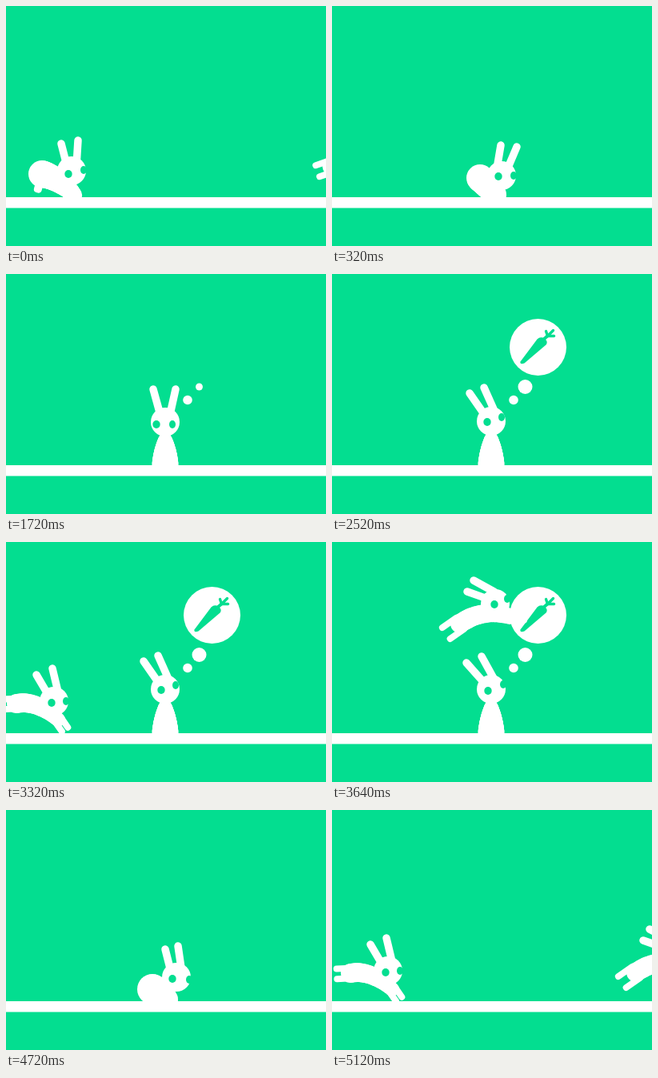
Recreate the animation shown at these times as an HTML page with a canvas. Size 400 px wide and 300 px high, loop 5.16 s.

```html
<!DOCTYPE html>
<html lang="en">
<head>
<meta charset="utf-8">
<title>Rabbits</title>
<style>
html, body { margin: 0; width: 100%; height: 100%; overflow: hidden; background: #03de90; }
canvas { display: block; width: 400px; height: 300px; }
</style>
</head>
<body>
<canvas id="stage" width="400" height="300"></canvas>
<script>
const g = document.getElementById('stage').getContext('2d');
const GREEN = '#03de90', WHITE = '#fff', LOOP = 5160, STEP = 40, TAU = Math.PI * 2;

// Offsets from the head centre.
// body: hip, middle and chest as x, y, radius; hind: length, angle, spread; fore: length, angle
// ears: two tips; eyes: two centres
const pose = (body, hind, fore, ears, eyes) => [...body, ...hind, ...fore, ...ears, ...eyes];
const blend = (a, b) => a.map((v, i) => (v + b[i]) / 2);

const rise = pose([-44, 25, 12, -15, 5, 12, 18, 16, 10], [21, 145, 8.5], [18, 0],
  [-35, -15, -27, -29], [-1, 1, 15, -6]);
const fall = pose([-47, 3, 12, -22, -2, 12, 5, 23, 9], [17, 177, 6.3], [15, 55],
  [-22, -33, -2, -41], [-3, 2, 15, 0]);
const glide = blend(rise, fall);
const land = pose([-37, 4, 17, -18, 8, 15, 3, 30, 10], [20, 105, 1], [4, 55],
  [-13, -34, 8, -38], [-4, 4, 15, -1]);
const sit = pose([-27, 3, 17, -18, 12, 16, -8, 24, 14], [0, 90, 3], [0, 60],
  [-1, -38, 19, -36], [-4, 1, 15, 0]);
const squat = pose([-30, 15, 19, -22, 20, 18, -12, 28, 14], [0, 90, 3], [0, 60],
  [-14, -35, 2, -39], [-5, 2, 16, 3]);
const rest = pose([-28, 12, 18, -20, 18, 17, -10, 27, 14], [0, 90, 3], [0, 60],
  [-7, -38, 11, -38], [-4, 2, 15, 1]);

const upright = (hipY, ears, eyes) =>
  pose([0, hipY, 16.5, 0, hipY - 17, 14.5, 0, 22, 8.5], [0, 90, 3], [0, 90], ears, eyes);
const stand = upright(53, [-15, -41, 13, -41], [-11, 3, 9, 3]);
const look = upright(54, [-27, -35, -9, -42], [-5, 1, 13, -5]);
const gaze = upright(54, [-31, -33, -12, -41], [-4, 2, 15, -6]);
const flinch = upright(54, [-34, -28, -16, -38], [-4, 2, 15, -5]);
const turn = upright(56, [-11, -41, 11, -41], [-3, 4, 15, 0]);
const settle = upright(55, [-13, -39, 10, -40], [-3, 3, 15, 0]);

const key = (t, x, y, p) => ({ t, v: [x, y, ...p] });

const thinker = [
  key(-240, -80, 184, rise), key(-120, 10, 181, glide), key(-40, 70, 201, fall),
  key(0, 82, 206, land), key(60, 98, 209, sit), key(120, 125, 192, rise),
  key(200, 172, 189, glide), key(260, 197, 203, fall), key(320, 212, 212, sit),
  key(400, 220, 213, squat), key(560, 223, 209, rest), key(920, 223, 209, rest),
  key(1000, 222, 213, squat), key(1200, 199, 182, stand), key(1400, 199, 185, stand),
  key(1720, 199, 185, stand), key(1860, 199, 183, gaze), key(2000, 199, 184, look),
  key(3400, 199, 184, look), key(3640, 199, 184, gaze), key(3760, 199, 184, flinch),
  key(3960, 198, 182, turn), key(4280, 198, 184, settle), key(4560, 198, 184, settle),
  key(4720, 213, 209, squat), key(4800, 245, 185, rise), key(4880, 302, 180, glide),
  key(4960, 352, 199, fall), key(5000, 370, 206, land), key(5060, 388, 208, sit),
  key(5120, 424, 178, rise), key(5160, 453, 186, glide), key(5280, 550, 190, fall)
];
const thief = [
  key(3160, -70, 185, rise), key(3240, 0, 181, glide), key(3320, 60, 199, fall),
  key(3360, 78, 206, land), key(3420, 95, 210, sit), key(3480, 118, 176, rise),
  key(3560, 160, 115, rise), key(3640, 204, 77, rise), key(3720, 255, 73, glide),
  key(3840, 315, 142, fall), key(3920, 341, 201, land), key(3960, 350, 209, squat),
  key(4020, 357, 211, squat), key(4080, 386, 180, rise), key(4140, 430, 181, glide),
  key(4220, 500, 190, fall)
];

// Monotone cubic interpolation between keys.
function sample(keys, t) {
  const last = keys.length - 1;
  if (t <= keys[0].t) return keys[0].v;
  if (t >= keys[last].t) return keys[last].v;
  let k = 0;
  while (keys[k + 1].t <= t) k++;
  const span = keys[k + 1].t - keys[k].t, u = (t - keys[k].t) / span;
  const slope = (n, i) => n < 0 || n >= last ? 0
    : (keys[n + 1].v[i] - keys[n].v[i]) / (keys[n + 1].t - keys[n].t);
  const tangent = (n, i) => {
    if (n === 0 || n === last) return slope(n === 0 ? 0 : last - 1, i);
    const a = slope(n - 1, i), b = slope(n, i);
    return a * b <= 0 ? 0 : 2 * a * b / (a + b);
  };
  return keys[k].v.map((p, i) => {
    const q = keys[k + 1].v[i], w = 1 - u;
    return p * w * w * (1 + 2 * u) + q * u * u * (3 - 2 * u)
      + span * u * w * (tangent(k, i) * w - tangent(k + 1, i) * u);
  });
}

function disc(x, y, rx, ry = rx, color = WHITE) {
  if (rx <= 0 || ry <= 0) return;
  g.fillStyle = color;
  g.beginPath();
  g.ellipse(x, y, rx, ry, 0, 0, TAU);
  g.fill();
}

function line(x1, y1, x2, y2, width, color = WHITE) {
  g.strokeStyle = color;
  g.lineWidth = width;
  g.beginPath();
  g.moveTo(x1, y1);
  g.lineTo(x2, y2);
  g.stroke();
}

function legs(x, y, len, deg, spread) {
  const a = deg * Math.PI / 180, c = Math.cos(a), s = Math.sin(a);
  for (const side of [-spread, spread]) {
    const bx = x - s * side, by = y + c * side;
    line(bx, by, bx + c * len, by + s * len, 8);
  }
}

function rabbit(v, open) {
  const [x, y, hx, hy, hr, mx, my, mr, fx, fy, fr, hl, ha, hs, fl, fa,
    ax, ay, bx, by, ex, ey, ox, oy] = v;
  if (x < -90 || x > 490) return;
  g.save();
  g.beginPath();
  g.rect(0, 0, 400, 241);
  g.clip();
  g.translate(x, y);

  const bend = (a, b, c, u) => a * (1 - u) ** 2 + 2 * b * u * (1 - u) + c * u * u;
  for (let i = 0; i <= 24; i++) {
    const u = i / 24;
    disc(bend(hx, mx, fx, u), bend(hy, my, fy, u), bend(hr, mr, fr, u));
  }
  legs(hx, hy, hl, ha, hs);
  legs(fx, fy, fl, fa, 4.5);

  const tilt = 0.6 * Math.atan2(ax + bx, -ay - by);
  const c = Math.cos(tilt), s = Math.sin(tilt);
  for (const [tx, ty, root] of [[ax, ay, -7], [bx, by, 7]])
    line(root * c + 13 * s, root * s - 13 * c, tx, ty, 9.5);

  disc(0, 0, 18);
  disc(ex, ey, 4.7, 4.9 * open, GREEN);
  disc(ox, oy, 4, 4.9 * open, GREEN);
  g.restore();
}

const clamp = n => Math.max(0, Math.min(1, n));
const ramp = (t, start, end) => clamp((t - start) / (end - start));

function pop(t, start, end) {
  const u = ramp(t, start, end) - 1;
  return t < start ? 0 : 1 + 2.2 * u ** 3 + 1.2 * u * u;
}

function carrot() {
  g.fillStyle = GREEN;
  g.beginPath();
  g.moveTo(-22, 18);
  g.lineTo(-1, -10);
  g.quadraticCurveTo(3, -14, 8, -11);
  g.quadraticCurveTo(13, -7, 10, -3);
  g.lineTo(-17, 20);
  g.quadraticCurveTo(-23, 22, -22, 18);
  g.fill();
  line(6, -9, 13, -15, 4, GREEN);
  line(12, -14, 10, -20, 3.4, GREEN);
  line(12, -14, 19, -21, 3.4, GREEN);
  line(12, -14, 20, -14, 3.4, GREEN);
}

const BURST = 3680, GONE = 4160;
// Crumbs at 280 ms after the burst: x, y, radius.
const crumbs = [[223, 51, 3.5], [263, 11, 2], [275, 29, 0.8], [253, 73, 6.5],
  [260, 76, 5.5], [241, 69, 1.2], [269, 77, 1.6], [236, 112, 4]];

function thought(t) {
  disc(227, 157.5, 5.8 * pop(t, 1620, 1720) * (1 - ramp(t, 3980, 4200)));
  const fade = ramp(t, 3800, 4200);
  disc(241.5, 141 - 15 * fade, 9 * pop(t, 1700, 1840) * (1 - fade ** 1.8));

  if (t < BURST) {
    const size = pop(t, 1780, 1980);
    if (size <= 0) return;
    g.save();
    g.translate(257.5, 91.5);
    g.scale(size, size);
    disc(0, 0, 35.5);
    carrot();
    g.restore();
  } else if (t < GONE) {
    const out = u => 1 - (1 - u) ** 3, mid = 280 / (GONE - BURST);
    const k = ramp(t, BURST, GONE), reach = out(k) / out(mid);
    for (const [x, y, r] of crumbs)
      disc(257 + (x - 257) * reach, 91 + (y - 91) * reach, r * (1 - k) / (1 - mid));
  }
}

function draw(t) {
  g.fillStyle = GREEN;
  g.fillRect(0, 0, 400, 300);
  g.lineCap = 'round';
  thought(t);
  const blink = 1 - 0.9 * Math.sin(Math.PI * ramp(t, 2320, 2520));
  rabbit(sample(thinker, t), blink);
  if (t < 200) rabbit(sample(thinker, t + LOOP), 1);
  if (t > LOOP - 260) rabbit(sample(thinker, t - LOOP), 1);
  rabbit(sample(thief, t), 1);
  g.fillStyle = WHITE;
  g.fillRect(0, 239, 400, 13.5);
}

function tick() {
  draw(Math.floor(performance.now() % LOOP / STEP) * STEP);
  requestAnimationFrame(tick);
}
tick();
</script>
</body>
</html>
```
